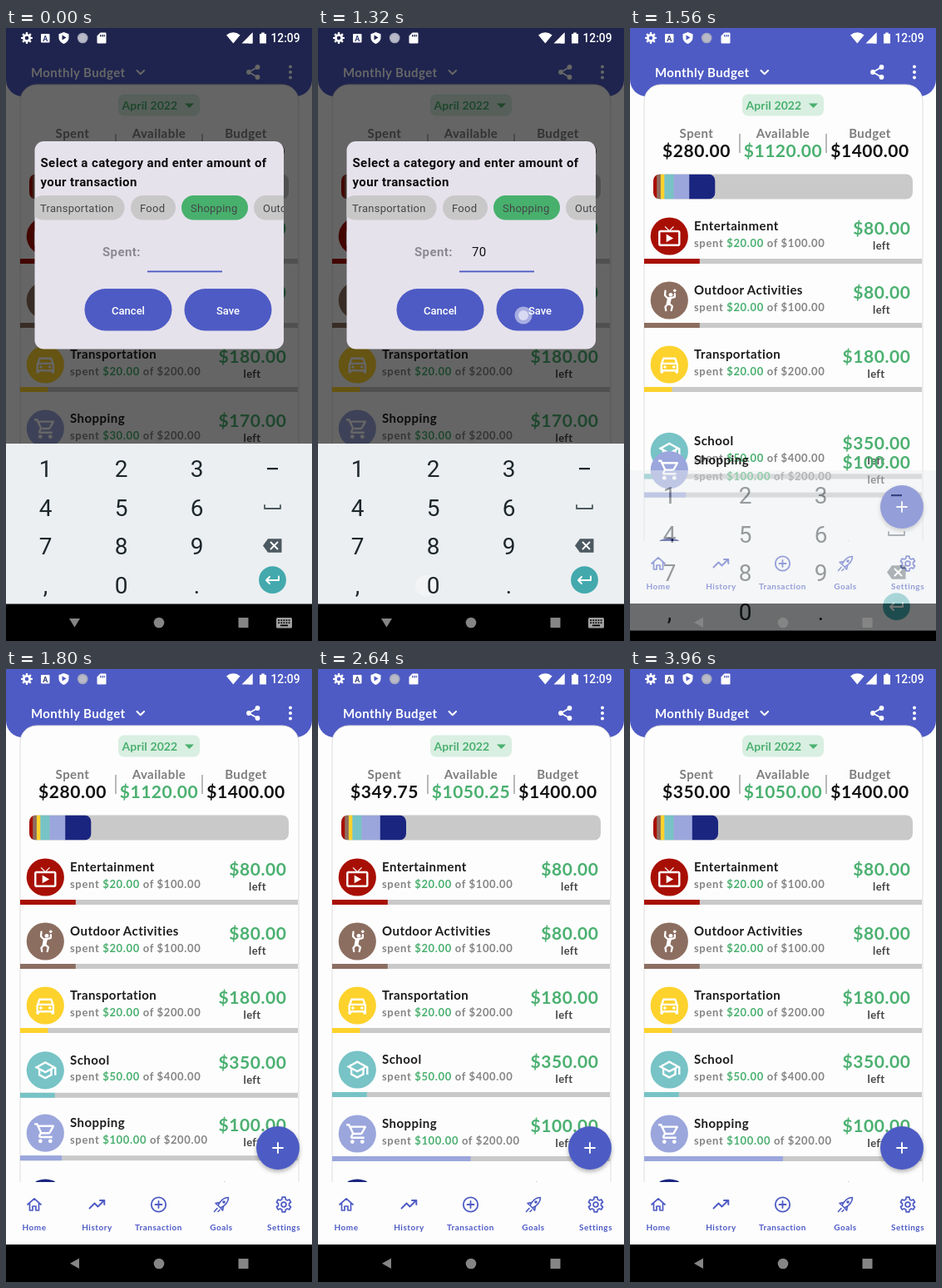
An HTML page for the animation above (4.08 s loop, 368x736 px).

```html
<!DOCTYPE html>
<html lang="en">
<head>
<meta charset="utf-8">
<title>Monthly Budget</title>
<style>
html, body { margin: 0; width: 100%; height: 100%; overflow: hidden; background: #fdfdfd; }
svg { display: block; width: 100vw; height: 100vh; }
text { white-space: pre; }
.app { font-family: Lato, "Open Sans", sans-serif; font-weight: 700; }
.sys { font-family: Roboto, "Noto Sans", sans-serif; }
.mid { text-anchor: middle; }
.end { text-anchor: end; }
.name { font-size: 15px; letter-spacing: .45px; }
.note { font-size: 13px; letter-spacing: .65px; }
.sum { font-size: 21px; letter-spacing: .55px; }
.tab { font-size: 10px; letter-spacing: .5px; }
.bold { font-size: 15px; font-weight: 700; letter-spacing: .4px; }
.chip { font-size: 13px; letter-spacing: .25px; }
.btn { font-size: 13px; font-weight: 500; }
.key { font-size: 28px; }
.line { fill: none; stroke-linecap: round; stroke-linejoin: round; }
</style>
</head>
<body>
<svg id="stage" viewBox="0 0 368 736" preserveAspectRatio="none"></svg>
<script>
const LOOP = 4080, STEP = 120;
const BLUE = '#4e5bc4', GREEN = '#4bb070', GRAY = '#7d7d7d', RAIL = '#c9c9c9';
const ROW_TOP = 250, PITCH = 77, BAR_X = 17, BAR_W = 334;
const PX_PER_DOLLAR = 312 / 1400;

const rect = (x, y, w, h, fill, r = 0, more = '') =>
  `<rect x="${x}" y="${y}" width="${w}" height="${h}" rx="${r}" fill="${fill}" ${more}/>`;
const disc = (x, y, r, fill, more = '') =>
  `<circle cx="${x}" cy="${y}" r="${r}" fill="${fill}" ${more}/>`;
const text = (x, y, str, cls, fill, more = '') =>
  `<text x="${x}" y="${y}" class="${cls}" fill="${fill}" ${more}>${str}</text>`;
const shape = (d, fill) => `<path d="${d}" fill="${fill}" fill-rule="evenodd"/>`;
const line = (d, color, w) => `<path class="line" d="${d}" stroke="${color}" stroke-width="${w}"/>`;
const at = (x, y, inner, scale = 1) => `<g transform="translate(${x} ${y}) scale(${scale})">${inner}</g>`;

// Closed outline of a cog with n teeth
function cog(outer, inner, n) {
  const pts = [];
  for (let i = 0; i < n; i++) {
    for (const [off, r] of [[-.32, inner], [-.2, outer], [.2, outer], [.32, inner]]) {
      const a = (i + off) / n * 2 * Math.PI - Math.PI / 2;
      pts.push((r * Math.cos(a)).toFixed(2) + ' ' + (r * Math.sin(a)).toFixed(2));
    }
  }
  return 'M' + pts.join('L') + 'Z';
}

// Category icons on a 24-unit grid
const icons = {
  tv: shape('M21 6h-7.6l3.3-3.3L16 2l-4 4-4-4-.7.7L10.6 6H3c-1.1 0-2 .9-2 2v12c0 1.1.9 2 2 2h18c1.1 0 2-.9 2-2V8c0-1.1-.9-2-2-2zm0 14H3V8h18zM9 10v8l7-4z', '#fff'),
  sport: disc(13.4, 6.4, 2, '#fff') + disc(17.4, 2.2, 1.5, '#fff') +
    line('M8 2.5L7.6 7 11 10.5M11 10.5L17.5 8.5V5.5', '#fff', 1.9) +
    line('M12 10.5L11 15', '#fff', 4) +
    line('M10.5 15.5L8 18.5 8.6 22M12 15.5L15 18 14 22', '#fff', 1.9),
  car: shape('M18.9 6c-.2-.6-.7-1-1.4-1h-11c-.7 0-1.2.4-1.4 1L3 12v8c0 .5.5 1 1 1h1c.5 0 1-.5 1-1v-1h12v1c0 .5.5 1 1 1h1c.5 0 1-.5 1-1v-8zM6.9 7h10.2l1.1 3.1H5.8zM19 17H5v-5h14z', '#fff') +
    disc(7.5, 14.5, 1.5, '#fff') + disc(16.5, 14.5, 1.5, '#fff'),
  cap: shape('M12 3L1 9l4 2.2v6L12 21l7-3.8v-6l2-1.1V17h2V9zm6.8 6L12 12.7 5.2 9 12 5.3zM17 16l-5 2.7L7 16v-3.7l5 2.7 5-2.7z', '#fff'),
  cart: shape('M15.5 13c.8 0 1.4-.4 1.8-1l3.6-6.5c.3-.7-.1-1.5-.9-1.5H5.2l-.9-2H1v2h2l3.6 7.6L5.3 14c-.8 1.4.2 3 1.7 3h12v-2H7l1.1-2zM6.2 6h12.1l-2.8 5h-7z', '#fff') +
    disc(7, 20, 2, '#fff') + disc(17, 20, 2, '#fff'),
  none: ''
};

const rows = [
  { name: 'Entertainment', spent: 20, of: 100, color: '#a80f04', icon: 'tv' },
  { name: 'Outdoor Activities', spent: 20, of: 100, color: '#8c6e60', icon: 'sport' },
  { name: 'Transportation', spent: 20, of: 200, color: '#fdd22c', icon: 'car' },
  { name: 'School', spent: 50, of: 400, color: '#77c3c6', icon: 'cap' },
  { name: 'Shopping', spent: 30, of: 200, color: '#9ba6dc', icon: 'cart' },
  { name: '', spent: 140, of: 400, color: '#1a2580', icon: 'none' }
];
const SHOP = 4;
const money = v => '$' + v.toFixed(2);
const noteOf = (spent, of) =>
  `spent <tspan fill="${GREEN}">${money(spent)}</tspan> of ${money(of)}`;
const leftX = v => v < 100 ? 302.5 : 296;

function rowMarkup(r, i) {
  const left = r.of - r.spent;
  return `<g id="row${i}" transform="translate(0 ${ROW_TOP + PITCH * i})">` +
    disc(47.3, 0, 22.6, r.color) + at(32.9, -14.4, icons[r.icon], 1.2) +
    text(77, -7, r.name, 'app name', '#1c1c1c') +
    text(77, 12.5, noteOf(r.spent, r.of), 'app note', '#858585', `id="note${i}"`) +
    text(337.5, -2, money(left), 'app sum end', GREEN, `id="amount${i}"`) +
    text(leftX(left), 16, 'left', 'app note mid', '#444', 'style="letter-spacing:.3px"') +
    rect(BAR_X, 27, BAR_W, 6, RAIL) +
    rect(BAR_X, 27, BAR_W * r.spent / r.of, 6, r.color, 0, `id="bar${i}"`) + '</g>';
}

function totalBar() {
  let x = 28, out = '';
  rows.forEach((r, i) => {
    const w = r.spent * PX_PER_DOLLAR;
    out += rect(x, 175.5, w + .3, 30, r.color, 0, `id="seg${i}"`);
    x += w;
  });
  return rect(28, 175.5, 312, 30, RAIL, 8) + `<g clip-path="url(#fillClip)">${out}</g>`;
}

const column = (x, label, value, color, id) =>
  text(x, 132, label, 'app name mid', GRAY) +
  text(x, 155, value, 'app sum mid', color, `id="${id}"`);

function header() {
  return rect(0, -30, 368, 112, BLUE, 20) +
    text(30, 58.5, 'Monthly Budget', 'app name', '#fff', 'style="letter-spacing:.4px"') +
    line('M157.5 51l4.3 4.3 4.3-4.3', '#fff', 2) +
    line('M302.5 47L292 53l10.500 6', '#fff', 1.7) +
    [[302.5, 47], [292, 53], [302.5, 59]].map(p => disc(...p, 2.9, '#fff')).join('') +
    [46.5, 53, 59.5].map(y => disc(342, y, 2, '#fff')).join('');
}

function card() {
  return `<path d="M17 620V88a20 20 0 0 1 20-20H332a20 20 0 0 1 20 20V620z" fill="#fdfdfd" stroke="#dedede"/>` +
    rect(135, 79.500, 98, 26, '#d9efe1', 7) +
    text(139.5, 97.500, 'April 2022', 'app', GREEN, 'font-size="14" letter-spacing=".1"') +
    shape('M215 90.500h11l-5.500 5.500z', GREEN) +
    column(80, 'Spent', '$280.00', '#111', 'spent') +
    column(184, 'Available', '$1120.00', GREEN, 'free') +
    column(288.5, 'Budget', '$1400.00', '#111', 'budget') +
    rect(131.5, 127, 1, 23, '#777') + rect(235.5, 127, 1, 23, '#777') + totalBar() +
    `<g clip-path="url(#listClip)">${rows.map(rowMarkup).join('')}</g>`;
}

function tabs() {
  const art = [
    ['Home', 34, line('M-8 0L0-7.200 8 0M-5.500-1.500V7h3.500V2h4v5h3.500v-8.500', BLUE, 1.7)],
    ['History', 109.5, line('M-9 4.500L-3-1.500 1 2.500 8-4.500M3.500-5H8.800V0', BLUE, 1.9)],
    ['Transaction', 183.500, `<circle r="8.700" fill="none" stroke="${BLUE}" stroke-width="1.800"/>` + line('M-4 0H4M0-4V4', BLUE, 1.8)],
    ['Goals', 259, line('M-4 1C-1-5 3-8.500 8.500-8.500 8.500-3 5 1 -1 4zM-2.500-2.500L-7-1.500-4 1M2.500 2.500L1.500 7-1 4M-5 4.500L-8.500 8.500M-2 6.500L-4 8.500', BLUE, 1.6) + disc(3, -3, 1.8, BLUE)],
    ['Settings', 334, line(cog(9, 6.6, 6), BLUE, 1.7) + `<circle r="2.900" fill="none" stroke="${BLUE}" stroke-width="1.700"/>`]
  ];
  return rect(0, 616, 368, 76, '#fdfdfd') + art.map(([label, x, icon]) =>
    at(x, 643, icon) + text(x, 673.5, label, 'app tab mid', BLUE)).join('');
}

const fab = () => disc(327, 575, 26, BLUE, 'filter="url(#shadow)"') +
  line('M321 575h12M327 569v12', '#fff', 1.9);

function chip(x, w, label, fill = '#c9c8c9') {
  return rect(x, 201, w, 29.500, fill, 14.7) + text(x + 11, 220.5, label, 'sys chip', '#454549');
}

function dialog() {
  const button = (x, label) => rect(x, 313, 105, 50.5, BLUE, 25.2) +
    text(x + 52.5, 343.5, label, 'sys btn mid', '#fff');
  return rect(34.5, 136, 299.5, 249.5, '#e6e2ec', 11) +
    text(41.5, 167, 'Select a category and enter amount of', 'sys bold', '#0c0c0c') +
    text(41.5, 189.5, 'your transaction', 'sys bold', '#0c0c0c') +
    `<g clip-path="url(#chipClip)">` + chip(30, 112.5, 'Transportation') + chip(150, 54, 'Food') +
    chip(211, 80, 'Shopping', '#47b06c') + chip(298, 126, 'Outdoor Activities') + '</g>' +
    text(116, 274, 'Spent:', 'sys bold', '#8c8a8f') +
    text(185, 274, '', 'sys', '#111', 'id="entry" font-size="15" letter-spacing=".4"') +
    rect(170, 291.5, 90, 1.8, BLUE) + button(94.5, 'Cancel') + button(214.5, 'Save');
}

function keyboard() {
  const keys = ['123', '456', '789', ',0.'];
  const ink = '#1d262b', dim = '#4c5960';
  return rect(0, 499, 368, 192.5, '#ebeff1') +
    disc(130, 669.5, 13, '#fff', 'id="glow" opacity=".35"') +
    keys.map((set, j) => [...set].map((k, i) =>
      text([47.5, 138.5, 229.5][i], 539 + 46.7 * j, k, 'sys key mid', ink)).join('')).join('') +
    rect(314, 528, 13, 2.2, ink) + line('M311 573v4h19v-4', dim, 1.8) +
    shape('M309 621.500l6-8.300h16.500v16.500H315z', dim) + line('M318.500 617.500l8 8M326.500 617.500l-8 8', '#fff', 1.9) +
    disc(320.5, 662.7, 16.4, '#43a9ad') +
    line('M328 658.500v4.500H313.500M317 659l-4 4 4 4', '#fff', 2);
}

function statusBar() {
  const w = '#fff';
  return at(25, 12, shape(cog(7, 5, 8) + 'M2.300 0a2.300 2.300 0 1 0-4.600 0a2.300 2.300 0 1 0 4.600 0', w)) +
    rect(42, 7, 10.5, 10.5, w, 1) + text(47.3, 15.5, 'A', 'sys mid', '#333a70', 'font-size="9" font-weight="700"') +
    shape('M69.500 5l6 2.300v4.200c0 3.500-2.500 6-6 7.500-3.500-1.500-6-4-6-7.500V7.300zM67.500 8.500v6l5-3z', w) +
    disc(92.2, 12, 6.3, '#a9abbd') + disc(92.2, 12, 4.6, '#b9bac8') +
    shape('M113.500 5.500h6q1 0 1 1v11q0 1-1 1h-9q-1 0-1-1v-8zM113 8v2.500h1.300V8zM115.300 8v2.500h1.300V8zM117.500 8v2.500h1.300V8z', w) +
    shape('M265 8.500q8.300-6.500 16.600 0L273.300 18.500z', w) +
    shape('M296.500 5.500v13h-13z', w) + shape('M296.500 5.500v13h-4.500v-8.500z', '#fff') +
    shape('M305 7h2.200V5.500h3.600V7h2.200v11.500h-8z', w) +
    text(353.5, 17, '12:09', 'sys end', w, 'font-size="13.8" font-weight="500"');
}

function navIcons() {
  const c = '#858585', k = '#a0a0a0';
  const dots = [0, 1, 2, 3, 4].map(i =>
    rect(327.3 + i * 3.1, 710.3, 1.7, 1.7, '#000') + rect(327.3 + i * 3.1, 713.3, 1.7, 1.7, '#000')).join('');
  return `<g id="down">${shape('M76 709h13l-6.500 10.500z', c)}${rect(325, 708, 19, 12.5, k, 1.5)}${dots}${rect(330, 716.5, 9, 1.7, '#000')}</g>` +
    `<g id="back">${shape('M88 707.500v12.500l-11-6.200z', c)}</g>` +
    disc(184, 714, 6.3, c) + rect(279.5, 708, 12, 12, c, .5);
}

const stage = document.getElementById('stage');
stage.innerHTML = `<defs>
  <clipPath id="listClip">${rect(17, 68, 335, 548, '#000')}</clipPath>
  <clipPath id="chipClip">${rect(34.5, 195, 299.5, 40, '#000')}</clipPath>
  <clipPath id="fillClip">${rect(28, 175.5, 62, 30, '#000', 8, 'id="fill"')}</clipPath>
  <filter id="shadow" x="-30%" y="-30%" width="160%" height="170%">
    <feDropShadow dx="0" dy="2.500" stdDeviation="2.500" flood-color="#000" flood-opacity=".3"/>
  </filter></defs>` +
  rect(0, 0, 368, 736, '#fdfdfd') + header() + card() + tabs() + fab() +
  rect(0, 0, 368, 736, '#000', 0, 'id="scrim"') + statusBar() +
  `<g id="dialog">${dialog()}</g>` + rect(0, 691, 368, 45, '#000') +
  `<g id="keys">${keyboard()}</g>` + navIcons() +
  `<g id="touch">${disc(0, 0, 10.5, '#fff', 'opacity=".5"')}${disc(0, 0, 6, '#fff', 'opacity=".55"')}</g>`;

const el = id => document.getElementById(id);
const set = (id, attrs) => {
  for (const k in attrs) el(id).setAttribute(k, attrs[k]);
};
const show = (id, on) => set(id, { display: on ? 'inline' : 'none' });

// Critically damped spring from 0 to 1
const spring = (ms, speed) => {
  const x = Math.max(0, ms) / 1000 * speed;
  return 1 - (1 + x) * Math.exp(-x);
};

// Finger: from, to, x, y
const taps = [[240, 480, 40, 623], [840, 1080, 130, 669.5], [1200, 1560, 247, 345]];

function draw(t) {
  const closing = t >= 1440, saved = t >= 1560;

  set('scrim', { opacity: saved ? 0 : closing ? .4 : .6 });
  set('dialog', { opacity: saved ? 0 : closing ? .35 : 1 });
  el('entry').textContent = t < 480 ? '' : t < 1080 ? '7' : '70';

  show('keys', t < 1680);
  set('keys', { opacity: saved ? .45 : 1, transform: `translate(0 ${saved ? 32 : 0})` });
  show('glow', t >= 960 && !saved);
  show('down', !saved);
  show('back', saved);

  const tap = taps.find(p => t >= p[0] && t < p[1]);
  show('touch', !!tap);
  if (tap) set('touch', { transform: `translate(${tap[2]} ${tap[3]})` });

  // School and Shopping trade places
  const swap = spring(t - 1440, 18.3) * PITCH;
  const low = ROW_TOP + 4 * PITCH, high = low - PITCH;
  set('row3', { transform: `translate(0 ${low - swap})` });
  set('row4', { transform: `translate(0 ${high + swap})` });

  const count = spring(t - 1800, 9.286);
  el('note4').innerHTML = noteOf(saved ? 100 : 30, 200);
  el('amount4').textContent = money(saved ? 100 : 170);
  set('bar4', { width: BAR_W * (.15 + .35 * count) });
  el('spent').textContent = money(280 + 70 * count);
  el('free').textContent = money(1120 - 70 * count);

  const shop = saved ? 18.7 + 3.6 * count : 30 * PX_PER_DOLLAR;
  const navyX = 28 + 110 * PX_PER_DOLLAR + shop, navyW = 140 * PX_PER_DOLLAR;
  set('seg' + SHOP, { width: shop + .3 });
  set('seg5', { x: navyX });
  set('fill', { width: navyX + navyW - 28 });
}

const start = performance.now();
function tick() {
  const t = (performance.now() - start) % LOOP;
  draw(Math.floor(t / STEP) * STEP);
  requestAnimationFrame(tick);
}
tick();
</script>
</body>
</html>
```
